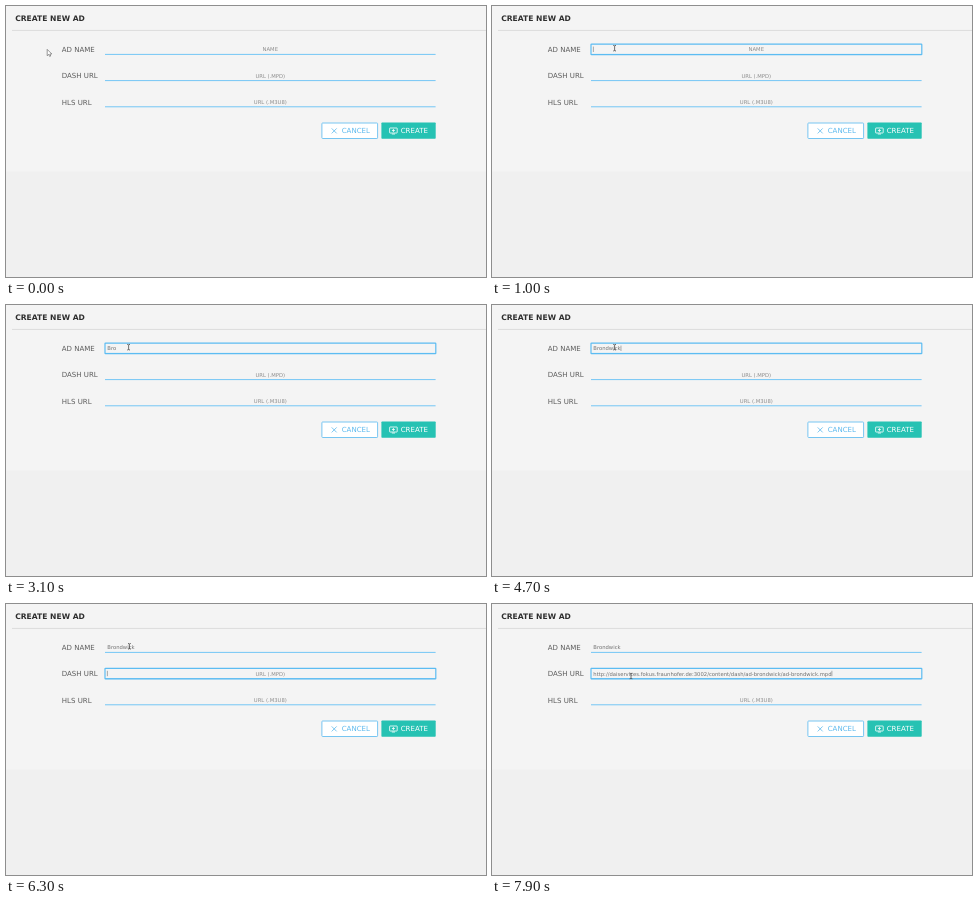
Write an HTML page that moves like this. It is 480 px wide and 271 px high and loops after 8 s.

```html
<!DOCTYPE html>
<html lang="en">
<head>
<meta charset="utf-8">
<title>Create new ad</title>
<style>
  html, body { margin: 0; width: 100%; height: 100%; overflow: hidden; background: #f0f0f0; }
  svg { display: block; width: 100%; height: 100%; }
  text { font: 5.27px "DejaVu Sans", sans-serif; fill: #707070; text-rendering: geometricPrecision; white-space: pre; }
  .title { font-size: 7.6px; font-weight: bold; fill: #2e2e2e; }
  .label, .button { font-size: 7.02px; fill: #5c5c5c; }
  .hint { fill: #8c8c8c; text-anchor: middle; }
  .tip text { font-size: 5.05px; fill: #fff; stroke: #fff; stroke-width: .12px; }
</style>
</head>
<body>
<svg viewBox="0 0 480 271" preserveAspectRatio="none">
  <rect width="480" height="165.3" fill="#f4f4f4"/>
  <text class="title" x="9.2" y="14.6">CREATE NEW AD</text>
  <path d="M6 24.4H480" stroke="#dcdcdc"/>
  <g id="rows"></g>

  <rect x="315.9" y="117" width="55.7" height="15.5" rx=".7" fill="#fff" stroke="#69c0f1" stroke-width=".9"/>
  <path d="M325.7 122.4l5 5m0-5l-5 5" stroke="#5cb9ee" stroke-width=".8"/>
  <text class="button" x="335.7" y="127.4" style="fill:#5cb9ee">CANCEL</text>

  <rect x="375.4" y="116.6" width="54.3" height="16.2" rx=".7" fill="#26c2b3"/>
  <g fill="none" stroke="#fff" stroke-width=".8">
    <rect x="383.6" y="122" width="7.6" height="5" rx=".4"/>
    <path d="M387.4 123v3m-1.5-1.5h3M385.8 128h3.2"/>
  </g>
  <text class="button" x="394.7" y="127.4" style="fill:#fff">CREATE</text>

  <g id="tips"></g>
  <path id="arrow" d="M0 0V6.3L1.5 5L2.5 7.1L3.5 6.6L2.6 4.6H4.6Z" fill="#fff" stroke="#555" stroke-width=".6"/>
  <path id="beam" d="M-1.4-2.8Q0-2.8 0-2V2Q0 2.8-1.4 2.8M1.4-2.8Q0-2.8 0-2M0 2Q0 2.8 1.4 2.8" fill="none" stroke="#444" stroke-width=".75"/>
</svg>
<script>
const LOOP = 8000, STEP = 100;
const BRAND = "Brondwick";
const SLUG = "ad-" + BRAND.toLowerCase();
const URL_TEXT = `http://daiservices.fokus.fraunhofer.de:3002/content/dash/${SLUG}/${SLUG}.mpd`;

// [time, letters typed, caret visible]
const NAME_STEPS = [
  [0, 0, 0], [900, 0, 1], [1800, 1, 1], [2000, 1, 0], [2200, 2, 1], [2300, 3, 1],
  [3100, 3, 0], [3900, 4, 1], [4100, 5, 1], [4200, 6, 1], [4400, 7, 1],
  [4600, 8, 1], [4700, 9, 1], [5500, 9, 0]
];
const URL_STEPS = [[0, 0, 0], [5800, 0, 1], [6900, 0, 0], [7900, URL_TEXT.length, 1]];

// [time, x, y, shape]
const POINTER = [
  [0, 41.2, 43.4, "arrow"], [300, 58, 43.1, "arrow"], [400, 88, 43, "arrow"],
  [500, 113, 44.2, "beam"], [600, 121.2, 44, "beam"], [800, 122.2, 43, "beam"],
  [900, 122.6, 42.2, "beam"], [6300, 123.4, 42.3, "beam"], [6400, 129, 55, "arrow"],
  [6500, 137, 68, "beam"], [6600, 139, 72, "beam"]
];

const $ = id => document.getElementById(id);
const at = (steps, t) => steps.findLast(s => s[0] <= t);
const ramp = (t, start) => Math.min(1, Math.max(0, (t - start + STEP) / (3 * STEP)));

function add(parent, tag, attrs, text = "") {
  const el = document.createElementNS("http://www.w3.org/2000/svg", tag);
  for (const key in attrs) el.setAttribute(key, attrs[key]);
  el.textContent = text;
  return parent.appendChild(el);
}

function makeRow(index, label, hint) {
  const g = add($("rows"), "g", { transform: `translate(0 ${index * 26.2})` });
  add(g, "text", { class: "label", x: 55.8, y: 46.3 }, label);
  add(g, "path", { d: "M99 48.4H429.6", stroke: "#74c6f5", "stroke-width": 1 });
  const ring = add(g, "rect", {
    x: 99, y: 38.1, width: 330.8, height: 10.6, rx: .5,
    fill: "none", stroke: "#5cbcf2", "stroke-width": 1.2, opacity: 0
  });
  return {
    ring,
    hint: add(g, "text", { class: "hint", x: 264.3, y: 45.4 }, hint),
    value: add(g, "text", { x: 101.3, y: 45.4 }),
    caret: add(g, "path", { d: "M0 40.6V46", stroke: "#777", "stroke-width": .6 })
  };
}

function makeTip(x, y, width, text) {
  const g = add($("tips"), "g", { class: "tip", transform: `translate(${x} ${y})` });
  add(g, "rect", { width, height: 10, rx: 1.8, fill: "#1f1f1f" });
  add(g, "text", { x: 2.1, y: 6.7 }, text);
  return g;
}

const show = (el, on) => el.setAttribute("visibility", on ? "visible" : "hidden");

function setRow(row, text, [, count, caretOn], focus) {
  const value = text.slice(0, count);
  if (row.value.textContent !== value) row.value.textContent = value;
  show(row.hint, !count);
  show(row.caret, caretOn);
  const end = count ? row.value.getComputedTextLength() + .3 : 0;
  row.caret.setAttribute("transform", `translate(${101.4 + end} 0)`);
  row.ring.setAttribute("opacity", focus);
}

const nameRow = makeRow(0, "AD NAME", "NAME");
const dashRow = makeRow(1, "DASH URL", "URL (.MPD)");
show(makeRow(2, "HLS URL", "URL (.M3U8)").caret, false);
const nameTip = makeTip(122.3, 49.5, 67.5, "Insert a name for the ad.");
const dashTip = makeTip(138.6, 79.4, 112.4, "Insert url which links to a DASH file (.mpd).");

function draw(t) {
  const swap = ramp(t, 5700);
  setRow(nameRow, BRAND, at(NAME_STEPS, t), ramp(t, 800) * (1 - swap));
  setRow(dashRow, URL_TEXT, at(URL_STEPS, t), swap);
  show(nameTip, t >= 1500 && t < 1800);
  show(dashTip, t >= 7100 && t < 7900);
  const [, x, y, shape] = at(POINTER, t);
  for (const id of ["arrow", "beam"]) show($(id), id === shape);
  $(shape).setAttribute("transform", `translate(${x} ${y})`);
}

const origin = performance.now();
function tick() {
  const t = (performance.now() - origin) % LOOP;
  draw(Math.floor(t / STEP) * STEP);
  requestAnimationFrame(tick);
}
tick();
</script>
</body>
</html>
```
